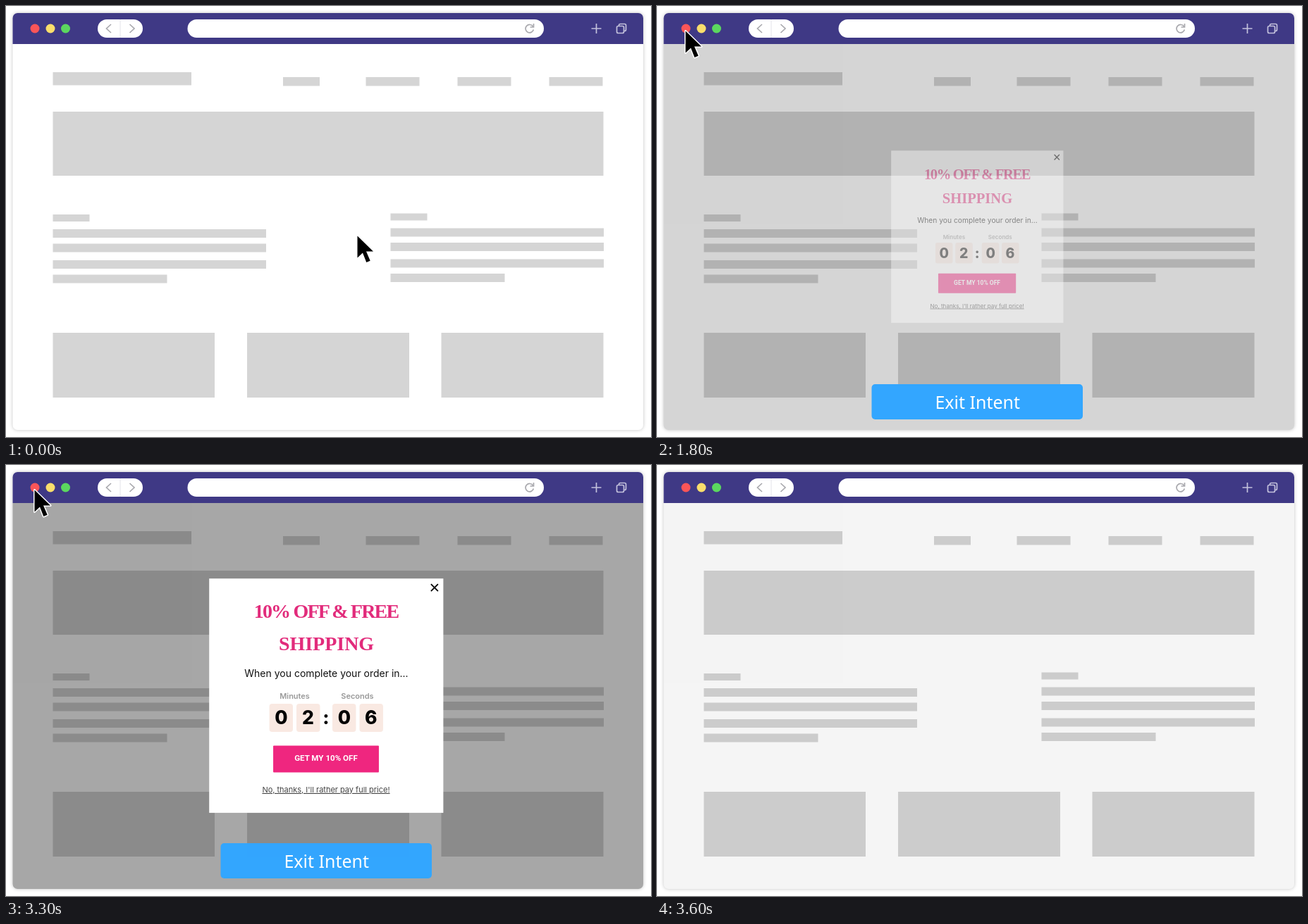
Animation of 915 by 612 pixels, one loop 3.7 s. Source, as an HTML page:

```html
<!DOCTYPE html>
<html lang="en">
<head>
<meta charset="utf-8">
<title>Exit intent popup</title>
<style>
  html, body { margin: 0; width: 100%; height: 100%; overflow: hidden; background: #fff; }
  svg { display: block; width: 915px; height: 612px; }
  text { text-anchor: middle; font-family: Inter, sans-serif; }

  .window { fill: #fff; filter: drop-shadow(0 0 2.5px rgba(0, 0, 0, .24)); }
  .bar { fill: #3f3985; }
  .blocks { fill: #d5d5d5; }
  .icon { fill: none; stroke: #a9a9ae; stroke-width: 1.7; }
  .light { stroke: #c3c1dc; }

  .title { font: 700 28px "Liberation Serif", serif; fill: #e22b7b; }
  .tight { letter-spacing: -1.8px; }
  .lead { font-size: 14px; fill: #111; }
  .unit { font-size: 11px; font-weight: 600; fill: #999; }
  .digit { font-size: 26.5px; font-weight: 800; fill: #000; }
  .cta { font: 700 11.6px Roboto, sans-serif; fill: #fff; }
  .decline { font-size: 11px; fill: #444; text-decoration: underline; }
  .label { font: 500 25px "Noto Sans", sans-serif; fill: #fff; }

  .dim, .popup, .tag, .cursor { animation: 3700ms linear infinite; }
  .dim { animation-name: dim; }
  .popup { animation-name: pop; transform-origin: 454.3px 327.7px; }
  .tag { animation-name: rise; }
  .cursor { animation-name: travel; }

  @keyframes dim {
    0%, 43.24% { opacity: 0; }
    45.95% { opacity: .05; }
    48.65% { opacity: .165; }
    51.35% { opacity: .28; }
    54.05%, 89.19% { opacity: .35; }
    91.89% { opacity: .235; }
    94.59% { opacity: .12; }
    97.3% { opacity: .04; }
    100% { opacity: 0; }
  }
  @keyframes pop {
    0%, 45.95% { opacity: 0; transform: scale(.6); }
    48.65% { opacity: .4; transform: scale(.733); }
    51.35% { opacity: .85; transform: scale(.93); }
    54.05%, 89.19% { opacity: 1; transform: none; }
    91.89% { opacity: .85; transform: scale(.93); }
    94.59% { opacity: .4; transform: scale(.733); }
    97.3%, 100% { opacity: 0; transform: scale(.6); }
  }
  @keyframes rise {
    0%, 18.92% { transform: translateY(80px); animation-timing-function: cubic-bezier(.2, .7, .3, 1); }
    29.73% { transform: none; }
    89.19% { transform: none; opacity: 1; }
    94.59%, 100% { transform: none; opacity: 0; }
  }
  @keyframes travel {
    0%, 24.32% { transform: translate(498px, 326px); animation-timing-function: cubic-bezier(.37, 0, .63, 1); }
    46.49% { transform: translate(40px, 35px); }
    89.19% { transform: translate(40px, 35px); opacity: 1; }
    94.59%, 100% { transform: translate(40px, 35px); opacity: 0; }
  }
</style>
</head>
<body>
<svg viewBox="0 0 915 612">
  <defs>
    <g id="para">
      <rect width="52" height="10"/>
      <path d="M0 21h302.500v12h-302.500zM0 41.500h302.500v12h-302.500zM0 65h302.500v12h-302.500zM0 85.500h162v12h-162z"/>
    </g>
    <rect id="tile" width="33.500" height="40" rx="4" fill="#f9e9e2"/>
  </defs>

  <rect class="window" x="9.500" y="10" width="894.500" height="592" rx="7"/>
  <path class="bar" d="M9.500 54V17a7 7 0 0 1 7-7H897a7 7 0 0 1 7 7V54z"/>
  <circle cx="41" cy="32" r="6.500" fill="#fa5558"/>
  <circle cx="63" cy="32" r="6.500" fill="#fade6c"/>
  <circle cx="84.500" cy="32" r="6.500" fill="#5bd75f"/>
  <g fill="#fff">
    <rect x="130" y="19" width="64" height="26" rx="13"/>
    <rect x="257.500" y="19" width="505.500" height="26" rx="13"/>
  </g>
  <path d="M162 19v26" stroke="#e4e4ea"/>
  <path class="icon" d="M149 26l-6.500 6 6.500 6M175.500 26l6.500 6-6.500 6M747.500 29a5.700 5.700 0 1 0 .8 4.500M748.500 25v5h-5"/>
  <path class="icon light" d="M837.500 25v14M830.500 32h14"/>
  <g class="icon light">
    <rect x="866.500" y="28.500" width="10" height="10" rx="2"/>
    <path d="M869.500 28v-.5a2 2 0 0 1 2-2h6a2 2 0 0 1 2 2v6a2 2 0 0 1-2 2h-.5"/>
  </g>

  <g class="blocks">
    <rect x="66.500" y="94" width="196.500" height="18.500"/>
    <rect x="393" y="101" width="52" height="12.500"/>
    <rect x="510.500" y="101" width="76" height="12.500"/>
    <rect x="640.500" y="101" width="76" height="12.500"/>
    <rect x="770.500" y="101" width="76" height="12.500"/>
    <rect x="66.500" y="150" width="781" height="91"/>
    <use href="#para" x="66.500" y="296"/>
    <use href="#para" x="545.500" y="294.500"/>
    <path d="M66.500 464h229.500v92h-229.500zM342 464h230v92h-230zM617.500 464h230v92h-230z"/>
  </g>

  <path class="dim" d="M9.500 54H904V595a7 7 0 0 1-7 7H16.500a7 7 0 0 1-7-7z"/>

  <g class="popup">
    <rect x="288" y="161" width="332.500" height="333" fill="#fff"/>
    <path d="M603 169l10 10M613 169l-10 10" stroke="#000" stroke-width="1.800"/>
    <text class="title tight" x="454" y="217">10% OFF &amp; FREE</text>
    <text class="title" x="454.500" y="263">SHIPPING</text>
    <text class="lead" x="454.500" y="301">When you complete your order in...</text>
    <text class="unit" x="409.500" y="332.500">Minutes</text>
    <text class="unit" x="498.500" y="332.500">Seconds</text>
    <use href="#tile" x="373.500" y="339"/>
    <use href="#tile" x="412" y="339"/>
    <use href="#tile" x="463" y="339"/>
    <use href="#tile" x="501.500" y="339"/>
    <g class="digit">
      <text x="390.300" y="368.500">0</text>
      <text x="428.500" y="368.500">2</text>
      <text x="454" y="368.500">:</text>
      <text x="480" y="368.500">0</text>
      <text x="517.800" y="368.500">6</text>
    </g>
    <rect x="379" y="398.500" width="150" height="38" rx="1" fill="#ef267f"/>
    <text class="cta" x="454" y="420">GET MY 10% OFF</text>
    <text class="decline" x="454" y="465">No, thanks, I'll rather pay full price!</text>
  </g>

  <g class="tag">
    <rect x="304.500" y="537" width="299.500" height="50" rx="5" fill="#33a6ff"/>
    <text class="label" x="454.700" y="572">Exit Intent</text>
  </g>

  <path class="cursor" d="M.5 .5V31.500L8 24.500 13.300 38 18.700 35.700 13 22.500H23z"
    stroke="#fff" stroke-width="3" paint-order="stroke" stroke-linejoin="round"/>
</svg>
</body>
</html>
```
